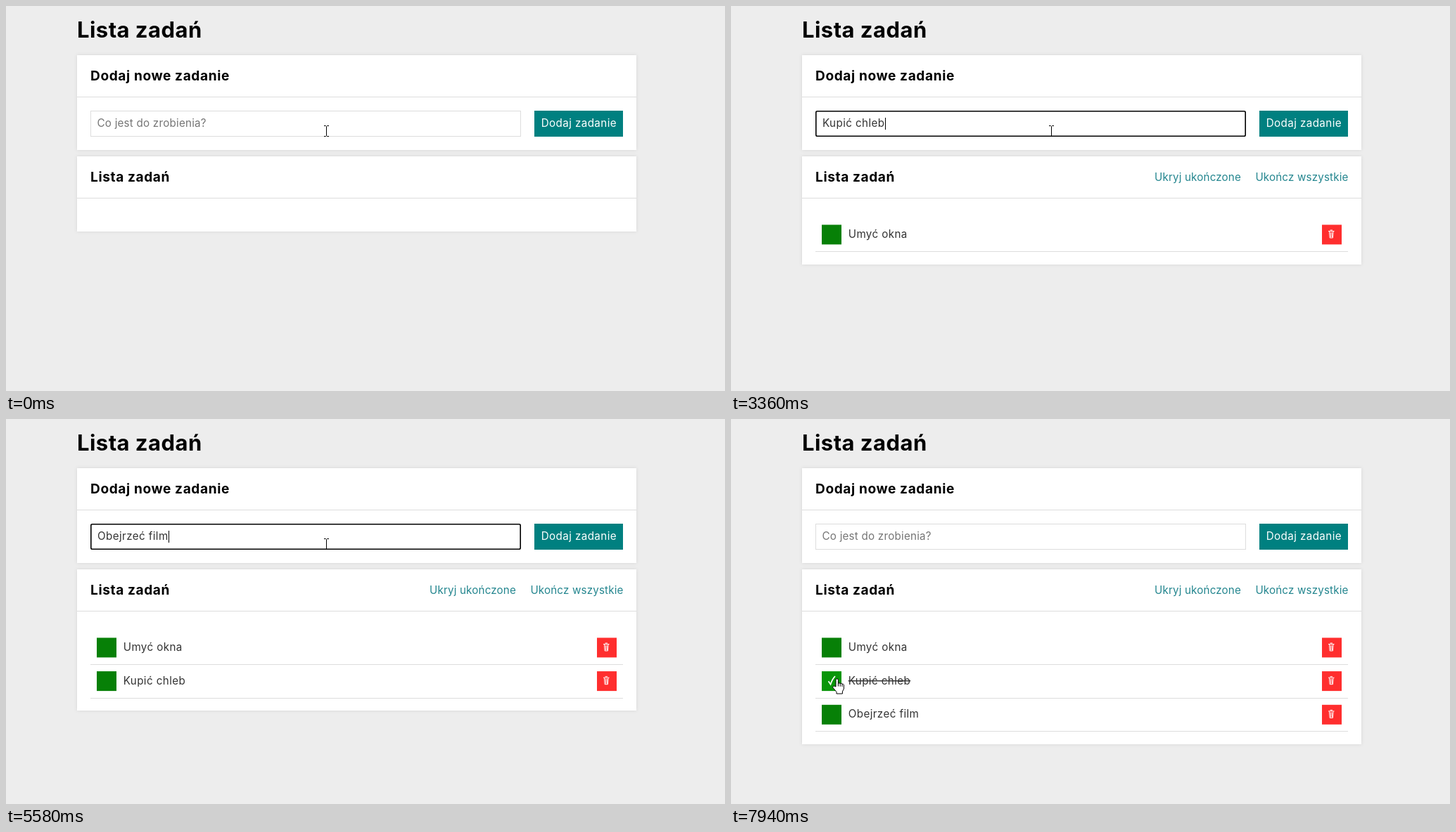
An HTML page for the animation above (8 s loop, 1022 px wide and 548 px high).

```html
<!DOCTYPE html>
<html lang="pl">
<head>
<meta charset="utf-8">
<title>Lista zadań</title>
<style>
  html, body { margin: 0; width: 100%; height: 100%; overflow: hidden; background: #ededed; }
  svg { display: block; font: 15.2px Inter, "Open Sans", sans-serif; letter-spacing: .4px; }
  text { fill: #333; white-space: pre; }
  .card { fill: #fff; filter: drop-shadow(0 0 2px #d4d4d4); }
  .line { fill: #ddd; shape-rendering: crispEdges; }
  .title { font-size: 31px; font-weight: 700; letter-spacing: .45px; fill: #000; }
  .head { font-size: 19.1px; font-weight: 700; letter-spacing: .6px; fill: #000; }
  .link { fill: #24868f; letter-spacing: .15px; }
  .hint { fill: #757575; letter-spacing: .22px; }
  .on-dark { fill: #fff; }
  .done { text-decoration: line-through; }
  .pen { fill: none; stroke: #fff; }
</style>
</head>
<body>
<svg width="1022" height="548">
  <text class="title" x="101" y="45">Lista zadań</text>
  <rect class="card" x="101" y="70" width="795" height="135"/>
  <text class="head" x="120" y="106">Dodaj nowe zadanie</text>
  <rect class="line" x="101" y="129" width="795" height="1"/>
  <rect x="120.5" y="149.5" width="611" height="36" fill="#fff" stroke="#ddd"/>
  <rect id="ring" x="120.8" y="149.8" width="610.4" height="35.4" rx="2" fill="none" stroke="#000" stroke-width="1.6"/>
  <text id="hint" class="hint" x="129.5" y="172">Co jest do zrobienia?</text>
  <text id="entry" x="130" y="172"></text>
  <rect id="caret" y="159" width="1" height="17"/>
  <rect x="751" y="149" width="126" height="37" fill="teal"/>
  <text class="on-dark" x="760.7" y="172">Dodaj zadanie</text>

  <rect id="list" class="card" x="101" y="214" width="795"/>
  <text class="head" x="120" y="250">Lista zadań</text>
  <rect class="line" x="101" y="273" width="795" height="1"/>
  <g id="links">
    <text class="link" x="602" y="249">Ukryj ukończone</text>
    <text class="link" x="877.5" y="249" text-anchor="end">Ukończ wszystkie</text>
  </g>
  <g id="rows"></g>

  <g id="pointer" stroke="#000" stroke-linejoin="round">
    <path id="beam" d="M-3.5-7.5h2.5l1 1 1-1h2.5M0-6.5v13M-3.5 7.5h2.5l1-1 1 1h2.5" fill="none"/>
    <path id="arrow" d="M0 0v16.5l3.8-3.6 2.4 5.7 2.6-1.1-2.4-5.6h5.3Z" fill="#fff"/>
    <path id="hand" d="M-2 11V1.5a1.7 1.7 0 0 1 3.4 0V7a1.4 1.4 0 0 1 2.8.3a1.4 1.4 0 0 1 2.8.6a1.3 1.3 0 0 1 2.4.8V14l-2 4v3H-1v-2.5L-6 12.5a1.6 1.6 0 0 1 2.4-2ZM1.4 7v3.5M4.2 7.3v3.5M7 7.9v3" fill="#fff"/>
  </g>
</svg>
<script>
const LOOP = 8000, FOCUS = 40, BLUR = 7700, CHECK = 7800, BLINK = 6300;
const tasks = [
  { text: "Umyć okna", added: 1970, keys: [370, 630, 780, 930, 1240, 1390, 1460, 1600, 1680] },
  { text: "Kupić chleb", added: 3580,
    keys: [2260, 2440, 2540, 2640, 2830, 2920, 3010, 3090, 3180, 3270, 3360] },
  { text: "Obejrzeć film", added: 5860,
    keys: [3910, 4170, 4310, 4400, 4480, 4590, 4740, 4950, 5180, 5280, 5380, 5480, 5580] },
];
const el = id => document.getElementById(id);
const show = (node, on) => node.style.display = on ? "" : "none";
const rowY = i => i * 47.7;

el("rows").innerHTML = tasks.map((task, i) => `
  <g transform="translate(0 ${rowY(i)})">
    <rect class="box" x="129" y="311.4" width="28" height="28" fill="#078007"/>
    <path class="tick pen" d="M138.5 325.5l3 4.5q2.5-7.5 6.5-11.5" stroke-width="1.7"/>
    <text x="166.7" y="330">${task.text}</text>
    <rect x="840" y="311.4" width="28" height="28" fill="#ff2e2e"/>
    <path class="pen" d="M849 320.5h8.5M851.5 319h3.5M850.5 321l.7 9h4.2l.7-9M852.3 322v7M854.3 322v7"/>
    <rect class="line" x="120" y="349" width="757" height="1"/>
  </g>`).join("");
const rows = [...el("rows").children];

function drawPointer(t) {
  const p = Math.min(1, Math.max(0, (t - 6700) / 850));
  const ease = p * p * (3 - 2 * p);
  const x = 455.5 - 304.5 * ease, y = 178 + 192 * ease;
  const inField = y < 186, onBox = x < 157 && y >= 359;
  el("pointer").setAttribute("transform", `translate(${x} ${y})`);
  show(el("beam"), inField);
  show(el("arrow"), !inField && !onBox);
  show(el("hand"), onBox);
  return onBox;
}

function draw(t) {
  const focused = t >= FOCUS && t < BLUR;
  const count = tasks.filter(task => t >= task.added).length;
  const current = tasks[count];
  const typed = current ? current.text.slice(0, current.keys.filter(k => t >= k).length) : "";
  const blink = t >= BLINK && Math.floor((t - BLINK) / 500) % 2 === 0;

  show(el("ring"), focused);
  show(el("hint"), !typed);
  el("entry").textContent = typed;
  el("caret").setAttribute("x", 130 + Math.round(typed ? el("entry").getComputedTextLength() : 0));
  show(el("caret"), focused && (typed || count === 0 || blink));

  el("list").setAttribute("height", count ? 106 + Math.round(rowY(count)) : 107);
  show(el("links"), count > 0);
  const hover = drawPointer(t);
  rows.forEach((row, i) => {
    const done = i === 1 && t >= CHECK;
    show(row, i < count);
    show(row.querySelector(".tick"), done);
    row.querySelector("text").classList.toggle("done", done);
    row.querySelector(".box").setAttribute("fill", i === 1 && hover ? "#0a960a" : "#078007");
  });
}

const start = performance.now();
function tick() {
  draw((performance.now() - start) % LOOP);
  requestAnimationFrame(tick);
}
tick();
</script>
</body>
</html>
```
